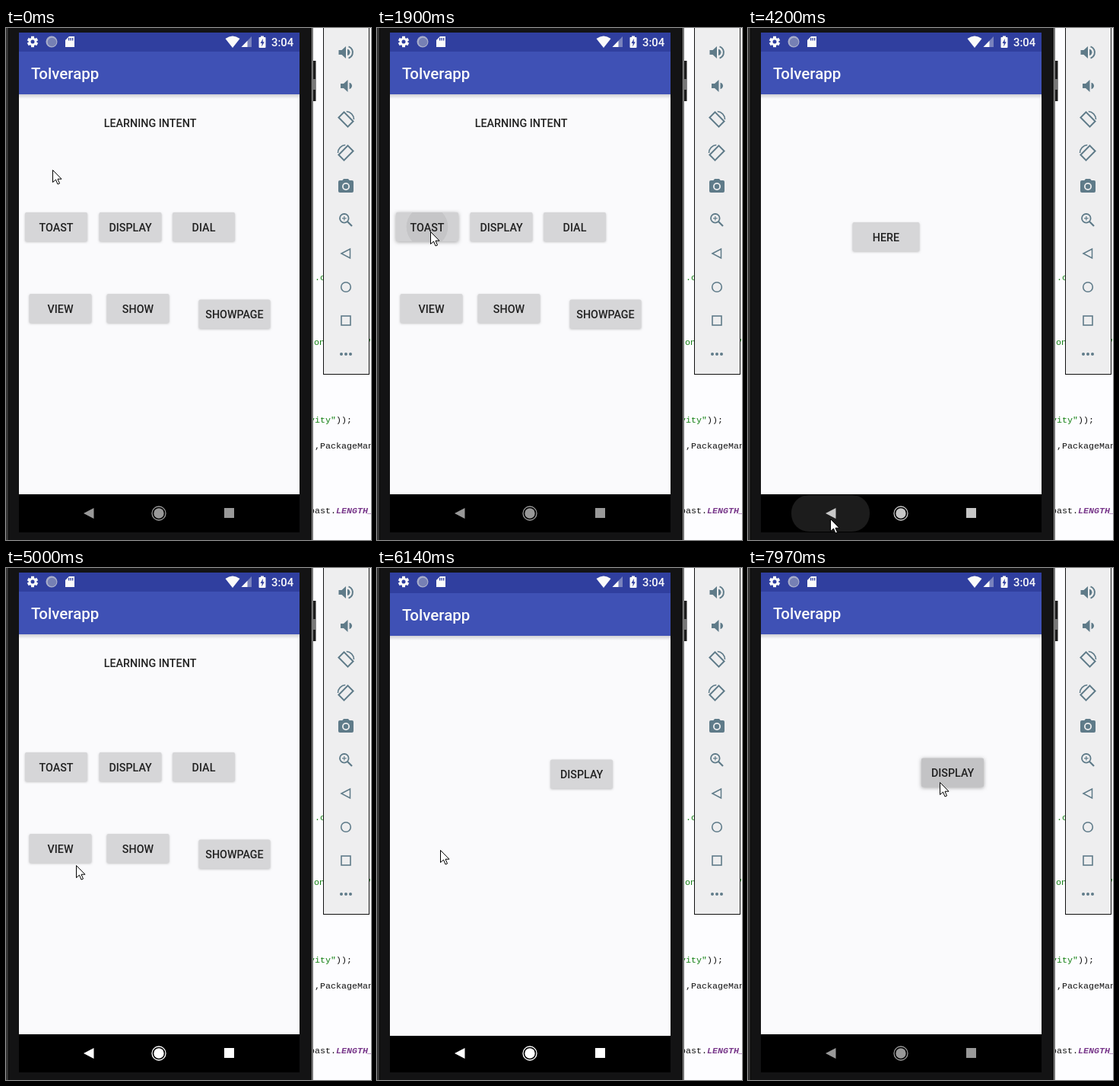
An HTML page with a canvas for the animation above (8000 ms loop, 480 by 672 pixels).

```html
<!DOCTYPE html>
<html lang="en">
<head>
<meta charset="utf-8">
<title>Phone emulator</title>
<style>
html, body { margin: 0; width: 100%; height: 100%; overflow: hidden; background: #fdfdff; }
canvas { display: block; width: 100vw; height: 100vh; }
</style>
</head>
<body>
<canvas id="stage" width="480" height="672"></canvas>
<script>
const W = 480, H = 672, LOOP = 8000;
const stage = document.getElementById('stage').getContext('2d');
const layer = document.createElement('canvas');
layer.width = W;
layer.height = H;
const page = layer.getContext('2d');

const SANS = 'Roboto, sans-serif';
const MONO = '"Liberation Mono", monospace';
const GREEN = '#138013', ICON = '#5f7b89', INK = '#212121';
const PAPER = '#fafafc', BAR = '#3f51b5', STATUS = '#303f9f', PANEL = '#eeeeef';

const OPEN_FIRST = 2150, BACK = 4340, OPEN_SECOND = 5985;
const SLIDE = 42;

// Pointer tip: time, x, y
const TRACK = [
  [0, 61, 186], [300, 61, 186], [1400, 70, 267], [3050, 70, 267],
  [4000, 108, 644], [4400, 108, 644], [5000, 92, 390], [5400, 83, 370],
  [6300, 83, 370], [7600, 252, 281], [8000, 252, 281]
];

const clamp = v => Math.max(0, Math.min(1, v));
const span = (t, a, b) => clamp((t - a) / (b - a));
const smooth = p => p * p * (3 - 2 * p);
const settle = p => 1 - Math.pow(1 - p, 5);

function rect(c, x, y, w, h, fill) {
  c.fillStyle = fill;
  c.fillRect(x, y, w, h);
}

function text(c, str, x, y, font, fill, align = 'left') {
  c.font = font;
  c.fillStyle = fill;
  c.textAlign = align;
  c.fillText(str, x, y);
}

function poly(c, pts, fill, stroke, width = 1) {
  c.beginPath();
  pts.forEach(([x, y]) => c.lineTo(x, y));
  c.closePath();
  if (fill) { c.fillStyle = fill; c.fill(); }
  if (stroke) { c.strokeStyle = stroke; c.lineWidth = width; c.stroke(); }
}

function disc(c, x, y, r, fill) {
  c.beginPath();
  c.arc(x, y, r, 0, Math.PI * 2);
  c.fillStyle = fill;
  c.fill();
}

function arc(c, x, y, r, a, b, stroke, width) {
  c.beginPath();
  c.arc(x, y, r, a, b);
  c.strokeStyle = stroke;
  c.lineWidth = width;
  c.stroke();
}

function line(c, x1, y1, x2, y2, stroke, width) {
  c.beginPath();
  c.moveTo(x1, y1);
  c.lineTo(x2, y2);
  c.strokeStyle = stroke;
  c.lineWidth = width;
  c.stroke();
}

function rounded(c, x, y, w, h, r, fill) {
  c.beginPath();
  c.roundRect(x, y, w, h, r);
  c.fillStyle = fill;
  c.fill();
}

// --- Editor behind the phone ---
function drawEditor(c) {
  rect(c, 0, 0, W, H, '#fdfdff');
  const code = '11.67px ' + MONO;
  text(c, '.c', 406, 331, code, GREEN);
  text(c, 'on', 405, 416, code, GREEN);
  text(c, '"', 476, 416, code, GREEN);
  text(c, 'vity"', 399, 518, code, GREEN);
  text(c, '));', 434, 518, code, '#111');
  text(c, ',PackageMan', 406, 552, code, '#111');
  text(c, 'oast.', 399, 637, code, '#111');
  text(c, 'LENGTH_', 434, 637, 'italic bold ' + code, '#7a3a8c');
}

// --- Emulator side bar ---
function rotateIcon(c, y, dir) {
  c.save();
  c.translate(447, y);
  c.scale(dir, 1);
  arc(c, 0, 0, 10.5, -1.5, 0, ICON, 1.6);
  c.rotate(Math.PI / 4);
  c.strokeStyle = ICON;
  c.lineWidth = 2;
  c.strokeRect(-8.5, -5, 17, 10);
  c.restore();
}

function speaker(c, x, y) {
  poly(c, [[x, y - 3], [x + 4, y - 3], [x + 9.5, y - 8], [x + 9.5, y + 8], [x + 4, y + 3], [x, y + 3]], ICON);
  c.beginPath();
  c.arc(x + 10.8, y, 4.2, -1.4, 1.4);
  c.fillStyle = ICON;
  c.fill();
}

function drawSideBar(c) {
  rect(c, 417, 0, 61, 455, '#111');
  rect(c, 418, 0, 59, 454, PANEL);
  speaker(c, 437.5, 32);
  arc(c, 448, 32, 8, -1.25, 1.25, ICON, 2);
  speaker(c, 440, 76);
  rotateIcon(c, 120, 1);
  rotateIcon(c, 164, -1);

  rounded(c, 437, 200, 20, 16, 2, ICON);
  poly(c, [[441.5, 201], [444, 198], [450, 198], [452.5, 201]], ICON);
  disc(c, 447, 208, 5, PANEL);
  disc(c, 447, 208, 3.2, ICON);

  arc(c, 444.8, 249.8, 5.8, 0, Math.PI * 2, ICON, 1.8);
  line(c, 449, 254, 455, 260, ICON, 2.2);
  line(c, 442, 249.8, 447.6, 249.8, ICON, 1.2);
  line(c, 444.8, 247, 444.8, 252.6, ICON, 1.2);

  poly(c, [[441, 296], [452.5, 290], [452.5, 302]], null, ICON, 1.5);
  arc(c, 447, 340, 6.3, 0, Math.PI * 2, ICON, 1.6);
  c.strokeStyle = ICON;
  c.lineWidth = 1.6;
  c.strokeRect(441, 378, 12, 12);
  for (const x of [441, 447, 453]) disc(c, x, 428, 2, ICON);
}

function drawFrame(c) {
  rect(c, 402, 43, 5.5, 53, '#1c1c1c');
  rect(c, 404, 67, 3, 14, '#777');
  rect(c, 0, 0, 404, H, '#353535');
  rect(c, 3, 0, 398, H, '#131314');
  rect(c, 3, 0, 1, H, '#080808');
  rect(c, 400, 0, 1, H, '#080808');
  rect(c, 402, 0, 2, H, '#777');
}

// --- App pages ---
function button(c, label, x, y, w, press) {
  const h = 38;
  c.save();
  c.shadowColor = press ? 'rgba(0,0,0,.35)' : 'rgba(0,0,0,.22)';
  c.shadowBlur = press ? 5 : 3;
  c.shadowOffsetY = 1;
  rounded(c, x, y, w, h, 2, '#d6d6d8');
  c.restore();
  if (press) {
    c.save();
    c.beginPath();
    c.roundRect(x, y, w, h, 2);
    c.clip();
    rect(c, x, y, w, h, `rgba(0,0,0,${0.03 * clamp(press * 2)})`);
    disc(c, x + w / 2, y + h / 2, 8 + 48 * press, 'rgba(0,0,0,.06)');
    c.restore();
  }
  text(c, label, x + w / 2, y + 24.5, '500 14.3px ' + SANS, INK, 'center');
}

function pageBase(c) {
  c.clearRect(0, 0, W, H);
  rect(c, 17, 6, 369, 607, PAPER);
  rect(c, 17, 6, 369, 25, STATUS);
  const shade = c.createLinearGradient(0, 87, 0, 93);
  shade.addColorStop(0, '#cfcfd4');
  shade.addColorStop(1, PAPER);
  rect(c, 17, 87, 369, 6, shade);
  rect(c, 17, 31, 369, 56, BAR);
  text(c, 'Tolverapp', 33, 67, '500 20.5px ' + SANS, '#fafafa');
  rect(c, 17, 612, 369, 50, '#000');
}

function mainPage(c, toast, view) {
  pageBase(c);
  text(c, 'LEARNING INTENT', 189.5, 130, '500 14.35px ' + SANS, INK, 'center');
  button(c, 'TOAST', 25, 242, 82, toast);
  button(c, 'DISPLAY', 122.5, 242, 82, 0);
  button(c, 'DIAL', 219, 242, 82, 0);
  button(c, 'VIEW', 30.5, 349, 82, view);
  button(c, 'SHOW', 132.5, 349, 82, 0);
  button(c, 'SHOWPAGE', 253.5, 356.5, 94, 0);
}

function herePage(c) {
  pageBase(c);
  button(c, 'HERE', 137.5, 255, 88, 0);
}

function displayPage(c, press) {
  pageBase(c);
  button(c, 'DISPLAY', 228, 249.5, 82, press);
}

function showPage(dy, alpha) {
  stage.save();
  stage.beginPath();
  stage.rect(17, 6, 369, 656);
  stage.clip();
  stage.globalAlpha = alpha;
  stage.drawImage(layer, 0, dy);
  stage.restore();
}

function drawPages(t) {
  const toast = t < 2500 ? span(t, 1740, 2140) : 0;
  const view = span(t, 5660, 5960);
  if (t < OPEN_FIRST + 400 || (t > BACK && t < OPEN_SECOND + 400)) {
    mainPage(page, toast, view);
    showPage(0, 1);
  }
  if (t >= OPEN_FIRST && t < BACK + 260) {
    const out = span(t, BACK, BACK + 260);
    const rest = 1 - settle(span(t, OPEN_FIRST, OPEN_FIRST + 350));
    herePage(page);
    showPage(Math.round(SLIDE * (rest + out * out)), span(t, OPEN_FIRST, OPEN_FIRST + 150) * (1 - out));
  }
  if (t >= OPEN_SECOND) {
    const rest = 1 - settle(span(t, OPEN_SECOND, OPEN_SECOND + 350));
    displayPage(page, span(t, 7700, 7940));
    showPage(Math.round(SLIDE * rest), span(t, OPEN_SECOND, OPEN_SECOND + 150));
  }
}

// --- System bars ---
function drawStatus(c) {
  const white = '#fafafa';
  for (let i = 0; i < 3; i++) {
    const a = i * Math.PI / 3 + Math.PI / 6, x = Math.cos(a) * 7.2, y = Math.sin(a) * 7.2;
    line(c, 35 - x, 18 - y, 35 + x, 18 + y, white, 4);
  }
  disc(c, 35, 18, 5.4, white);
  disc(c, 35, 18, 2.5, STATUS);

  disc(c, 60, 18, 7.5, '#a9aecb');
  disc(c, 60.5, 18.5, 5.8, '#7680b4');

  poly(c, [[83, 11], [90, 11], [90, 25], [78, 25], [78, 16]], white);
  for (const x of [82, 84.5, 87]) rect(c, x, 13, 1.3, 3.5, STATUS);

  c.beginPath();
  c.moveTo(298, 26);
  c.lineTo(288.5, 14);
  c.quadraticCurveTo(298, 7, 307.5, 14);
  c.closePath();
  c.fillStyle = white;
  c.fill();
  poly(c, [[309.5, 25], [323, 11], [323, 25]], '#7882bd');
  poly(c, [[309.5, 25], [317.5, 16.8], [317.5, 25]], white);

  rounded(c, 332.5, 12, 9, 14, 1, white);
  rect(c, 335, 10.5, 4, 2, white);
  poly(c, [[338, 14], [334.5, 20], [336.7, 20], [336.2, 24.5], [339.7, 18.2], [337.6, 18.2]], STATUS);
  text(c, '3:04', 349, 23.5, '500 14.8px ' + SANS, white);
}

function drawNav(c, t) {
  const hold = span(t, 4060, 4160) * (1 - span(t, 4320, 4600));
  if (hold > 0) {
    const w = 52 + 51 * span(t, 4060, 4180);
    c.save();
    c.globalAlpha = hold;
    rounded(c, 108.5 - w / 2, 613, w, 48, 23, '#1c1c1c');
    c.restore();
  }
  const lit = span(t, 4080, 4350) * (1 - span(t, 6600, 7100));
  const level = Math.round(153 + 102 * lit);
  const tone = `rgb(${level},${level},${level})`;
  poly(c, [[102, 637], [115.5, 630], [115.5, 644]], tone);
  disc(c, 201, 637, 6.7, tone);
  arc(c, 201, 637, 9, 0, Math.PI * 2, tone, 1.3);
  rect(c, 287, 630, 13, 13, tone);
}

function drawPointer(c, t) {
  let i = 1;
  while (i < TRACK.length - 1 && t > TRACK[i][0]) i++;
  const [t0, x0, y0] = TRACK[i - 1], [t1, x1, y1] = TRACK[i];
  const p = smooth(span(t, t0, t1));
  c.save();
  c.translate(Math.round(x0 + (x1 - x0) * p) + 0.5, Math.round(y0 + (y1 - y0) * p) + 0.5);
  poly(c, [[0, 0], [0, 16], [4, 12.5], [6.5, 18.5], [9, 17.5], [6.5, 11.7], [11.5, 11.7]], '#fff', '#000');
  c.restore();
}

function draw(t) {
  drawEditor(stage);
  drawSideBar(stage);
  drawFrame(stage);
  drawPages(t);
  drawStatus(stage);
  drawNav(stage, t);
  drawPointer(stage, t);
}

const start = performance.now();
function tick() {
  draw((performance.now() - start) % LOOP);
  requestAnimationFrame(tick);
}
tick();
</script>
</body>
</html>
```
